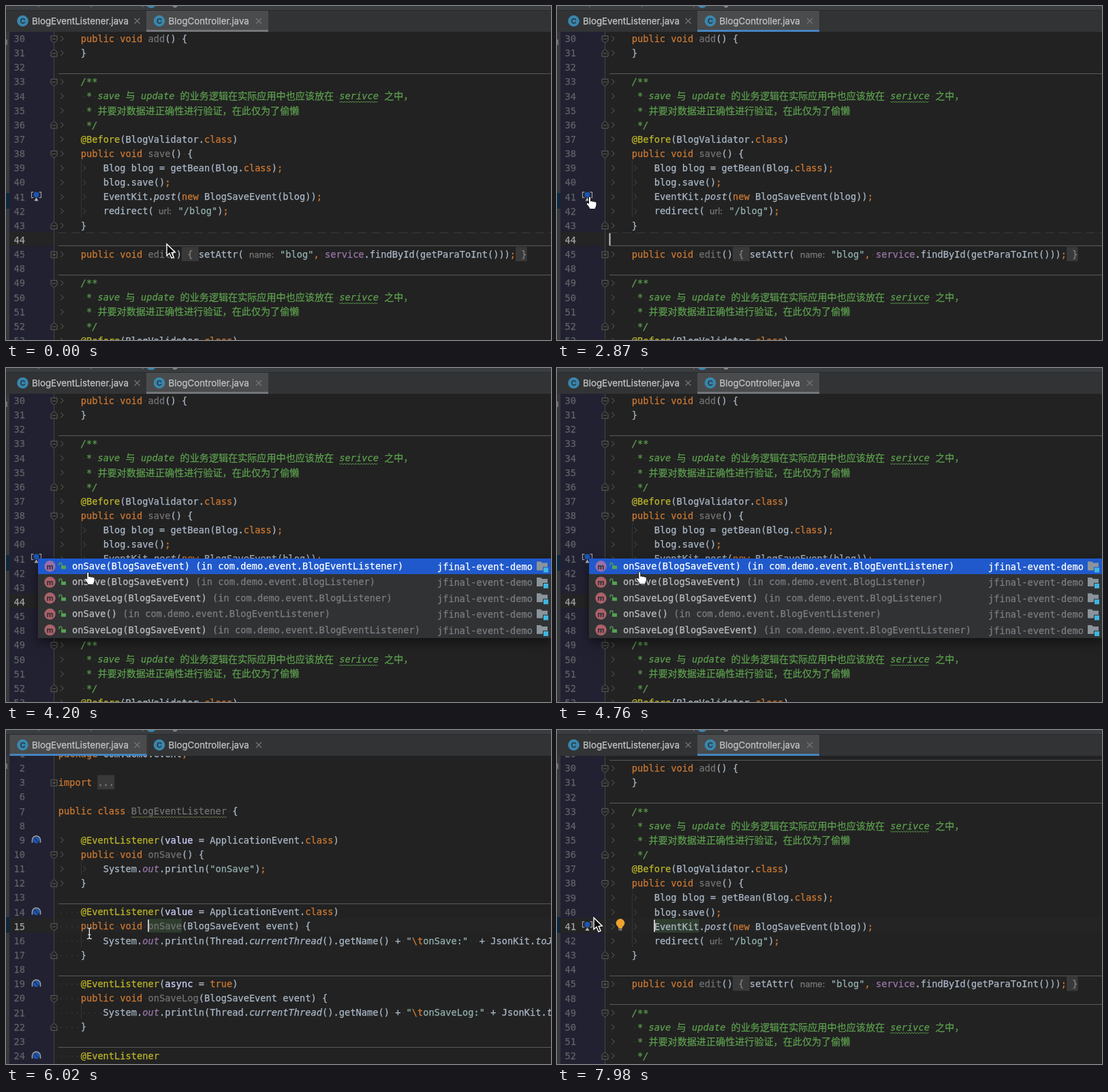
Animation, 800 px wide and 491 px high, one loop 8 s. Source, as an HTML page with a canvas:

```html
<!DOCTYPE html>
<html lang="zh-CN">
<head>
<meta charset="utf-8">
<title>Editor navigation</title>
<style>
html, body { margin: 0; width: 100%; height: 100%; overflow: hidden; background: #222; }
canvas { display: block; }
</style>
</head>
<body>
<canvas id="stage" width="800" height="491"></canvas>
<script>
const ctx = document.getElementById('stage').getContext('2d');
const LOOP = 8000, PITCH = 21.14, CELL = 8.242, LEFT = 76.7;
const MONO = '13.69px "DejaVu Sans Mono", monospace';
const ITALIC = 'italic ' + MONO;
const CJK = '14.1px "Noto Sans CJK SC", "Noto Sans CJK", sans-serif';
const UI = '13.3px Inter, sans-serif';
const BLUE = '#4585c0';

// Each style: colour, font, extra
const styles = {
  w: ['#a9b7c6', MONO], k: ['#cc7832', MONO], g: ['#727272', MONO],
  c: ['#5c9e4e', ITALIC], d: ['#5c9e4e', CJK], e: ['#5c9e4e', ITALIC, 'wave'],
  a: ['#bbb529', MONO], s: ['#92b0ae', MONO], f: ['#9876aa', ITALIC],
  u: ['#9876aa', MONO], i: ['#a9b7c6', ITALIC], v: ['#d0d0ff', MONO],
  h: ['#727272', MONO, 'wave'], b: ['#808080', MONO, 'box'],
  p: ['#787878', '12.5px Inter, sans-serif']
};

// Line format: number, gutter flags, space, text. "»" is a tab, "~x" picks style x, "@n " moves to x = n.
const comment = n => [
  `${n}- »~c/**`,
  `${n + 1} »~c * save ~d与~c update ~d的业务逻辑在实际应用中也应该放在~c ~eserivce~c ~d之中\uff0c`,
  `${n + 2} »~c * ~d并要对数据进正确性进行验证\uff0c在此仅为了偷懒`,
  `${n + 3}^ »~c */`,
  `${n + 4} »~a@Before~w(BlogValidator.~kclass~w)`
];
const controller = [
  '29_ ',
  '30- »~kpublic void ~gadd~w() {',
  '31^ »}',
  '32_ ',
  ...comment(33),
  '38- »~kpublic void ~gsave~w() {',
  '39 »»Blog blog = getBean(Blog.~kclass~w)~k;',
  '40 »»blog.save()~k;',
  '41p »»EventKit.~ipost~w(~knew ~wBlogSaveEvent(blog))~k;',
  '42 »»redirect(~p@224 url:~s@252.5 "/blog"~w)~k;',
  '43^ »}',
  '44_ ',
  '45+ »~kpublic void ~gedit~w()~b { ~wsetAttr(~p@357 name:~s@402 "blog"~k, ~uservice~w.findById(getParaToInt()))~k;~b }',
  '48_ ',
  ...comment(49)
];
const print = (label, gap) => String.raw`        System.~fout~w.println(Thread.~icurrentThread~w().getName() + ~s"~k\t~s${label}:"~w${gap}+ JsonKit.~itoJson~w(event))~k;`;
const listener = [
  '1 ~kpackage ~wcom.demo.event~k;',
  '2 ',
  '3+ ~kimport ~b...',
  '6 ',
  '7 ~kpublic class ~hBlogEventListener~w {',
  '8 ',
  '9l »~a@EventListener~w(~vvalue~w = ApplicationEvent.~kclass~w)',
  '10- »~kpublic void ~gonSave~w() {',
  '11 »»System.~fout~w.println(~s"onSave"~w)~k;',
  '12^ »}',
  '13_ ',
  '14l     ~a@EventListener~w(~vvalue~w = ApplicationEvent.~kclass~w)',
  '15-     ~kpublic void ~gonSave~w(BlogSaveEvent event) {',
  '16 ' + print('onSave', '  '),
  '17^     }',
  '18_ ',
  '19l     ~a@EventListener~w(~vasync~w = ~ktrue~w)',
  '20-     ~kpublic void ~gonSaveLog~w(BlogSaveEvent event) {',
  '21 ' + print('onSaveLog', ' '),
  '22^     }',
  '23_ ',
  '24l     ~a@EventListener'
];
const targets = [
  ['onSave(BlogSaveEvent)', 'BlogEventListener'],
  ['onSave(BlogSaveEvent)', 'BlogListener'],
  ['onSaveLog(BlogSaveEvent)', 'BlogListener'],
  ['onSave()', 'BlogEventListener'],
  ['onSaveLog(BlogSaveEvent)', 'BlogEventListener']
];

const FOCUS = 2500, POPUP = 3050, JUMP = 4900, BACK = 7490;

// Pointer stops: arrive time, x, y
const path = [
  [0, 236, 350], [350, 236, 350], [1400, 83, 320], [1800, 83, 320], [2600, 48, 280],
  [3250, 48, 280], [3900, 120, 300], [5300, 122, 299], [6000, 122, 299],
  [6900, 47, 267], [7500, 47, 267], [7900, 54, 276], [LOOP, 54, 276]
];

function rect(x, y, w, h, color) {
  ctx.fillStyle = color;
  ctx.fillRect(x, y, w, h);
}
// The thin outline gives the slightly heavier strokes of smoothed screen type.
function text(str, x, y, color, font = MONO, align = 'left') {
  ctx.font = font;
  ctx.fillStyle = ctx.strokeStyle = color;
  ctx.lineWidth = .25;
  ctx.textAlign = align;
  ctx.fillText(str, x, y);
  ctx.strokeText(str, x, y);
}
function disc(x, y, r, color) {
  ctx.fillStyle = color;
  ctx.beginPath();
  ctx.arc(x, y, r, 0, 7);
  ctx.fill();
}
function stroke(d, x, y, color, width = 1) {
  ctx.save();
  ctx.translate(x, y);
  ctx.strokeStyle = color;
  ctx.lineWidth = width;
  ctx.stroke(new Path2D(d));
  ctx.restore();
}
function shape(d, x, y, fill, outline, width = 1) {
  ctx.save();
  ctx.translate(x, y);
  ctx.fillStyle = fill;
  ctx.fill(new Path2D(d));
  ctx.restore();
  if (outline) stroke(d, x, y, outline, width);
}
function wave(x, y, w, color) {
  let d = 'M0 0';
  for (let i = 2; i <= w; i += 2) d += `L${i} ${i % 4 ? 2 : 0}`;
  stroke(d, x, y, color);
}

function drawCode(source, y) {
  let x = LEFT;
  for (const [, key, jump, part] of ('~w' + source).matchAll(/~(\w)(?:@([\d.]+) )?([^~]*)/g)) {
    const [color, font, extra] = styles[key];
    if (jump) x = +jump;
    const tabs = part.match(/^»*/)[0].length;
    for (let i = 0; i < tabs; i++, x += 4 * CELL)
      stroke('M-2 -4L2 0L-2 4', x + 5.5, y, i ? '#4c4c4c' : '#626262');
    const str = part.slice(tabs);
    ctx.font = font;
    const width = ctx.measureText(str).width;
    if (extra === 'box') rect(x, y - 11, width, 21, '#393939');
    text(str, x, y + 4.8, color, font);
    if (extra === 'wave') wave(x, y + 7.5, width, key === 'e' ? '#5c9e4e' : '#77774c');
    if (extra !== 'box') [...str].forEach((ch, i) => {
      if (ch === ' ') rect(x + (i + .5) * CELL - .6, y, 1.2, 1.2, '#484848');
    });
    x += width;
  }
}

function drawFold(flag, y) {
  const outlines = {
    '-': 'M-4.5 -4.5H4.5V2L0 6L-4.5 2Z',
    '^': 'M-4.5 4.5H4.5V-2L0 -6L-4.5 -2Z',
    '+': 'M-4.5 -4.5H4.5V4.5H-4.5Z'
  };
  shape(outlines[flag], 70.5, y + .5, '#222', '#606060');
  stroke('M-2.5 0H2.5' + (flag === '+' ? 'M0 -2.5V2.5' : ''), 70.5, y + .5, '#606060');
}
function drawPublisher(y) {
  stroke('M-4 -4H-7V4H-4M4 -4H7V4H4', 44.5, y - 3, '#9a9da0', 1.2);
  disc(44.5, y - 3, 4, '#1c55b5');
  shape('M0 0L3 5H-3Z', 44.5, y + 1, '#b4b6b8');
}
function drawReceiver(y) {
  disc(44.5, y, 4.7, '#1c55b5');
  stroke('M-3 -3L3 3', 44.5, y, '#14305f', 1.2);
  stroke('M-6 4V0A6 6 0 0 1 6 0V4', 44.5, y, '#a3a6a8', 1.5);
}

function drawEditor(lines, top, current) {
  rect(0, 0, 800, 491, '#222222');
  rect(5, 38, 65, 453, '#212132');
  lines.forEach((line, row) => {
    if (parseInt(line) === current) rect(5, top + row * PITCH - 12, 795, 21, '#242424');
  });
  rect(70, 38, 1, 453, '#464646');
  lines.forEach((line, row) => {
    const y = top + row * PITCH;
    const [, number, flags, source] = line.match(/^(\d+)([-^+_pl]*) (.*)$/);
    text(number, 28, y + 5, +number === current ? '#a4a3a3' : '#606366', MONO, 'right');
    if (flags === '_') rect(77, Math.round(y + 8.5), 723, 1, '#5a5a5a');
    else if (flags === 'p') drawPublisher(y);
    else if (flags === 'l') drawReceiver(y);
    else if (flags) drawFold(flags, y);
    if (/^(»»| {8})/.test(source)) rect(110, y - 12, 1, PITCH, '#343434');
    drawCode(source, y);
  });
}

function drawTab(x, width, label, active, focused) {
  if (active) {
    rect(x, 7, width, 31, '#494b4c');
    rect(x, 35, width, 3, focused ? BLUE : '#74777a');
  }
  disc(x + 19, 22, 8.3, '#3a86ad');
  text('C', x + 19, 26, '#243a46', '600 11px Inter, sans-serif', 'center');
  text(label, x + 32.5, 27, '#c3c5c6', UI);
  stroke('M-4 -4L4 4M4 -4L-4 4', x + width - 14, 22, '#75787a', 1.1);
}
function drawFrame(inListener, focused) {
  rect(0, 0, 5, 491, '#36393b');
  rect(0, 275, 5, 23, '#0d293e');
  text('n', -5, 57, '#85888a', UI);
  rect(0, 0, 800, 38, '#313335');
  rect(0, 0, 800, 6, '#3a3d3f');
  rect(0, 6, 800, 1, '#292b2d');
  disc(213, -5, 8, '#3a86ad');
  for (const x of [50, 127, 203]) stroke('M0 0L-3 3', x, -1, '#75787a');
  text('Blog', 224, -1, '#a8aaab', UI);
  drawTab(5.5, 201, 'BlogEventListener.java', inListener, focused);
  drawTab(206, 179, 'BlogController.java', !inListener, focused);
}

function drawPopup() {
  ctx.save();
  ctx.shadowColor = 'rgba(0, 0, 0, .5)';
  ctx.shadowBlur = 16;
  ctx.shadowOffsetY = 6;
  rect(47, 280, 753, 117, '#303234');
  ctx.restore();
  targets.forEach(([method, owner], i) => {
    const y = 291.5 + i * 23.4, selected = i === 0;
    if (selected) rect(47, 280, 753, 23, '#1f59cc');
    disc(64.5, y, 8.2, selected ? '#9a70a8' : '#a9626a');
    text('m', 64.5, y + 4, '#352b34', '600 11px Inter, sans-serif', 'center');
    rect(81, y - 1, 7, 5, '#55a352');
    stroke('M-4 0V-2A2 2 0 0 1 0 -2V1', 82, y - 1, '#55a352', 1.3);
    text(method, 97, y + 4.5, selected ? '#fff' : '#bcbebf');
    text(`(in com.demo.event.${owner})`, 97 + (method.length + 1) * CELL, y + 4.5, selected ? '#fff' : '#7b7e80');
    text('jfinal-event-demo', 773, y + 5.5, selected ? '#fff' : '#7b7e80', MONO, 'right');
    shape('M0 0H6L8 2H16V13H0Z', 779, y - 7, '#8b949a');
    rect(788, y + 1, 9, 9, selected ? '#1f59cc' : '#303234');
    rect(789, y + 2, 7, 7, '#40b6e0');
  });
}

function drawBulb(x, y) {
  disc(x, y - 2, 6.3, '#f0a22e');
  rect(x - 3, y + 3, 6, 3, '#f0a22e');
  rect(x - 2.5, y + 7, 5, 1.5, '#a5a5a5');
}
function drawCaret(x, y, age) {
  if (age % 1000 < 500) rect(x, y - 10, 2, 18, '#c4c4c4');
}
function highlight(word, column, y, color) {
  const x = LEFT + column * CELL;
  rect(x, y - 11, word.length * CELL, 20, '#2f3d2f');
  text(word, x, y + 4.8, color);
}

function pointerAt(t) {
  const i = path.findIndex((stop, n) => n && t <= stop[0]);
  const [t0, x0, y0] = path[i - 1], [t1, x1, y1] = path[i];
  const p = (t - t0) / (t1 - t0), eased = p * p * (3 - 2 * p);
  return [x0 + (x1 - x0) * eased, y0 + (y1 - y0) * eased];
}
function drawPointer(t) {
  const [x, y] = pointerAt(t);
  if ((t > 2550 && t < JUMP) || (t > 7000 && t < BACK))
    shape('M-1.5 1Q0 -1 1.5 1V7Q3 5.5 4.5 7.5Q6 6 7.5 8Q9 7 10 9V13Q9 16 8 18.5H0Q-1 15 -4.5 11.5Q-5 9 -3 9L-1.5 10.5Z', x, y, '#fff', '#111');
  else if (t >= JUMP && t < 6450) {
    const beam = 'M-3.5 -8Q0 -8 0 -6Q0 -8 3.5 -8M0 -6V6M-3.5 8Q0 8 0 6Q0 8 3.5 8M-2 2H2';
    stroke(beam, x + .5, y, '#222', 3);
    stroke(beam, x + .5, y, '#e6e6e6', 1.3);
  } else
    shape('M0 0V17L4 13.5L7 20.5L10 19.2L7.2 12.6L12.3 12Z', x, y, '#080808', '#fff', 1.4);
}

function draw(t) {
  const inListener = t >= JUMP && t < BACK;
  const popup = t >= POPUP && t < JUMP;
  const focused = t >= FOCUS && !popup;
  if (inListener) {
    const y = 35 + 12 * PITCH;
    drawEditor(listener, 35, 15);
    if (t > JUMP + 500) highlight('onSave', 16, y, styles.g[0]);
    drawCaret(208, y, t - JUMP);
  } else if (t < JUMP) {
    drawEditor(controller.slice(1), 48, 44);
    ctx.setLineDash([12, 8]);
    stroke('M77 0H800', 0, 333.5, '#3a3a3a');
    ctx.setLineDash([]);
    if (focused) drawCaret(76.5, 344, t - FOCUS);
  } else {
    const y = 35.2 + 12 * PITCH;
    drawEditor(controller, 35.2, 41);
    if (t > 7800) {
      highlight('EventKit', 8, y, styles.w[0]);
      drawBulb(93, y - 3);
    }
    drawCaret(142, y, t - BACK);
  }
  drawFrame(inListener, focused);
  if (popup) drawPopup();
  drawPointer(t);
}

function tick() {
  draw(performance.now() % LOOP);
  requestAnimationFrame(tick);
}
tick();
</script>
</body>
</html>
```
